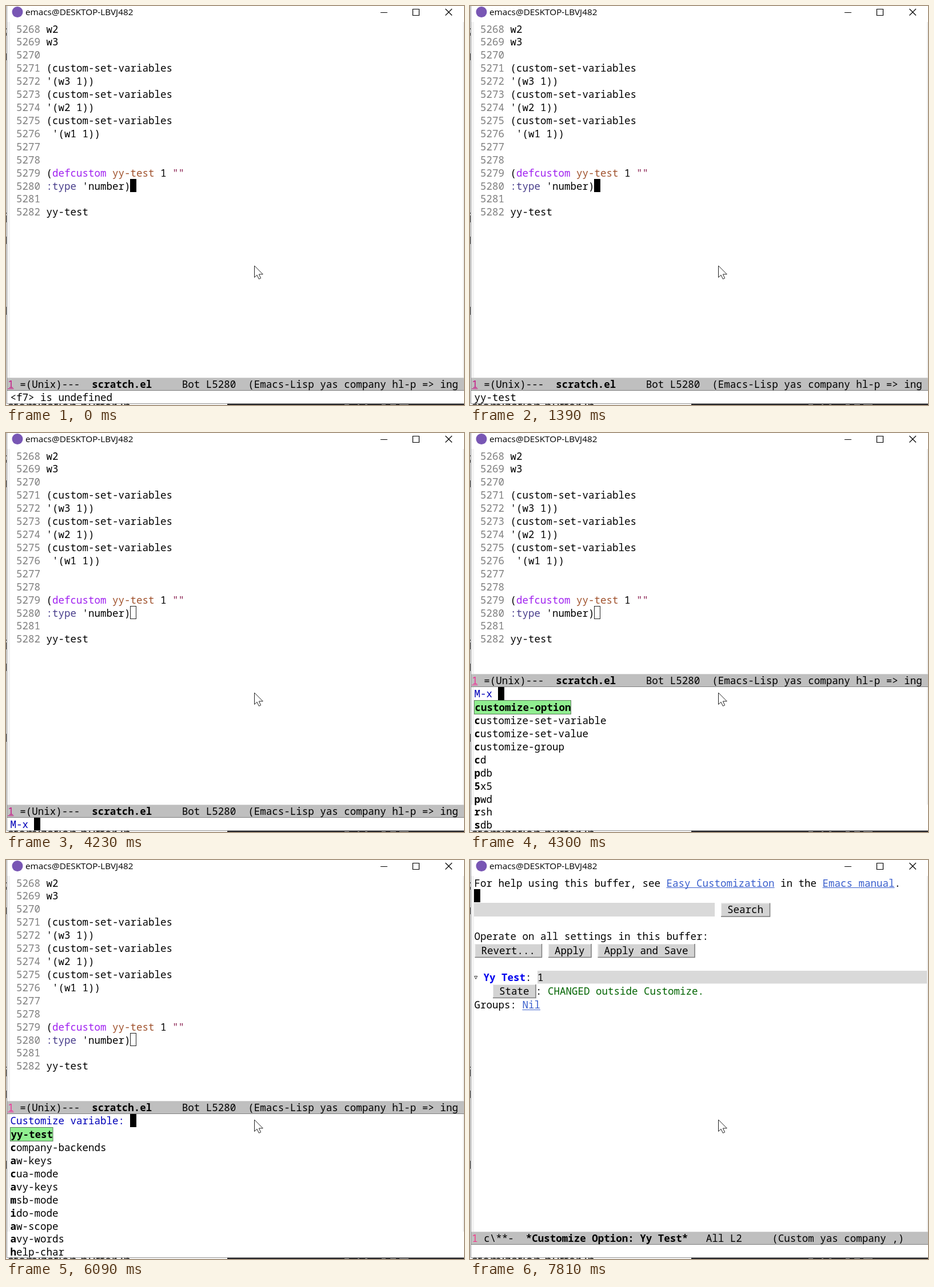
Write an HTML page that moves like this. It is 801 px wide and 699 px high and loops after 8000 ms.

```html
<!DOCTYPE html>
<html lang="en">
<head>
<meta charset="utf-8">
<title>Customize option</title>
<style>
html, body { margin: 0; width: 100%; height: 100%; overflow: hidden; background: #fff; }
svg { display: block; width: 801px; height: 699px; }
text { font: 17.5px "Noto Sans Mono", monospace; white-space: pre; }
text.ui { font: 15.3px "Open Sans", "Noto Sans", sans-serif; }
text.under { font: 22px "Noto Sans", sans-serif; }
.b { font-weight: 700; }
</style>
</head>
<body>
<svg id="stage" viewBox="0 0 801 699" xmlns="http://www.w3.org/2000/svg"></svg>
<script>
const NS = 'http://www.w3.org/2000/svg';
const stage = document.getElementById('stage');
const CW = 10.5, LH = 22.92, LEFT = 7.5, ASCENT = 17.5, LOOP = 8000;
const parts = [];

function add(parent, tag, attrs, text) {
  const el = document.createElementNS(NS, tag);
  for (const k in attrs) el.setAttribute(k, attrs[k]);
  if (text !== undefined) el.textContent = text;
  parent.appendChild(el);
  return el;
}
const rect = (g, x, y, width, height, fill, more) =>
  add(g, 'rect', { x, y, width, height, fill, ...more });
const path = (g, d, stroke, more) =>
  add(g, 'path', { d, stroke, fill: 'none', ...more });
const text = (g, x, y, str, fill = '#000', cls = '') =>
  add(g, 'text', { x, y, fill, class: cls }, str);

// Writes [string, colour, class] pieces one after another on the character grid.
function run(g, x, y, ...pieces) {
  for (const [str, fill, cls] of pieces) {
    text(g, x, y, str, fill, cls);
    x += str.length * CW;
  }
}

// A group that is visible in [from, to).
function scene(from, to) {
  const g = add(stage, 'g', {});
  parts.push({ g, from, to });
  return g;
}

function link(g, x, y, str) {
  text(g, x, y, str, '#3a5fcd');
  rect(g, x, Math.round(y + 1.5), str.length * CW, 1, '#3a5fcd');
}

function button(g, x, y, str) {
  const w = str.length * CW + 23, h = 24;
  rect(g, x, y, w, h, '#d3d3d3');
  path(g, `M${x + .5} ${y + h}V${y + .5}H${x + w}`, '#ededed');
  path(g, `M${x} ${y + h - .5}H${x + w - .5}V${y}`, '#7c7c7c', { 'stroke-width': 1.5 });
  text(g, x + 11, y + ASCENT, str);
}

function modeline(g, y, ...pieces) {
  rect(g, 2, y, 799, 22, '#bfbfbf');
  rect(g, 2, y, 799, 1, '#d4d4d4');
  rect(g, 2, y + 22, 799, 1, '#808080');
  run(g, 3.2, y + ASCENT, ...pieces);
}

// Cursors sit on whole pixels.
const cursor = (g, x, y) => rect(g, Math.floor(x), y, 11, 23, '#000');

function backdrop() {
  const g = add(stage, 'g', {});
  rect(g, 0, 0, 801, 699, '#fff');
  rect(g, 0, 0, 2, 699, '#f3f3f3');
  for (const [y, h] of [[39, 2], [47, 5], [83, 12], [362, 2], [367, 12], [404, 13], [527, 14]])
    rect(g, 0, y, 1.5, h, '#555');
  rect(g, 1, 0, 1, 697, '#8c8c8c');
  rect(g, 2, 28, 5, 623, '#f2f2f2');
  rect(g, 799, 28, 2, 623, '#ededed');

  add(g, 'circle', { cx: 20, cy: 10.5, r: 9.5, fill: '#7856b4' });
  text(g, 34, 16, 'emacs@DESKTOP-LBVJ482', '#000', 'ui');
  path(g, 'M655 11.5H667M711.5 5.5H722.5V16.5H711.5ZM768.5 5L780 16.5M780 5L768.5 16.5',
    '#000', { 'stroke-width': 1.2 });
}

function source() {
  const g = scene(0, 6700);
  const base = i => 46.5 + i * LH;
  const lines = ['w2', 'w3', '', '(custom-set-variables', "'(w3 1))",
    '(custom-set-variables', "'(w2 1))", '(custom-set-variables', " '(w1 1))",
    '', '', '', '', '', 'yy-test'];
  lines.forEach((line, i) =>
    run(g, LEFT + CW, base(i), [`${5268 + i} `, '#7f7f7f'], [line]));
  const x = LEFT + 6 * CW;
  run(g, x, base(11), ['('], ['defcustom', '#a020f0'], [' '],
    ['yy-test', '#a0522d'], [' 1 '], ['""', '#8b2252']);
  run(g, x, base(12), [':type', '#483d8b'], [" 'number)"]);

  cursor(scene(0, 4230), LEFT + 20 * CW, 303);
  rect(scene(4230, 6700), 217.5, 303.5, 10, 22, 'none', { stroke: '#222' });

  const bar = (from, to, top, pink) => {
    const m = scene(from, to);
    modeline(m, top, ['1', pink], [' =(Unix)---  '], ['scratch.el', '#000', 'b'],
      ['     Bot L5280  (Emacs-Lisp yas company hl-p => ing']);
    rect(m, 3, top + 19, CW, 1, pink);
  };
  bar(0, 4300, 651, '#c71585');
  bar(4300, 6700, 422, '#ee2f96');
}

function echo(from, to, str) {
  text(scene(from, to), LEFT, 674 + ASCENT, str);
}

function prompt(from, to, y, str) {
  const g = scene(from, to);
  text(g, LEFT, y + ASCENT, str, '#0000b8');
  cursor(g, LEFT + str.length * CW, y);
}

function candidates(from, to, first, rest) {
  const g = scene(from, to);
  rect(g, 7.5, 468.5, first.length * CW + 1, 24, '#90ee90', { stroke: '#5a7d5a' });
  text(g, 8.5, 486.5, first, '#000', 'b');
  rest.forEach((s, i) =>
    run(g, LEFT, 510 + i * LH, [s[0], '#000', 'b'], [s.slice(1)]));
}

function customize() {
  const g = scene(6700, LOOP);
  run(g, LEFT, 46.5, ['For help using this buffer, see ']);
  link(g, LEFT + 32 * CW, 46.5, 'Easy Customization');
  text(g, LEFT + 50 * CW, 46.5, ' in the ');
  link(g, LEFT + 58 * CW, 46.5, 'Emacs manual');
  text(g, LEFT + 70 * CW, 46.5, '.');

  rect(g, 7, 75, 421, 24, '#d9d9d9');
  button(g, 439, 75.5, 'Search');
  text(g, LEFT, 140, 'Operate on all settings in this buffer:');
  button(g, 8.5, 147, 'Revert...');
  button(g, 137, 147, 'Apply');
  button(g, 223.5, 147, 'Apply and Save');

  path(g, 'M7.7 203.5H12.8L10.2 208.5Z', '#222', { 'stroke-width': .9 });
  run(g, 23.5, 211.5, ['Yy Test', '#0000ee', 'b'], [':']);
  rect(g, 118, 194, 681, 22.5, '#d9d9d9');
  text(g, 118, 211.5, '1');
  button(g, 40, 218, 'State');
  run(g, 115, 235.5, [': '], ['CHANGED outside Customize.', '#006400']);
  text(g, LEFT, 260, 'Groups: ');
  link(g, LEFT + 8 * CW, 260, 'Nil');

  const top = scene(6700, 7810);
  cursor(top, LEFT, 28);
  text(top, LEFT, 46.5, 'F', '#fff');
  cursor(scene(7810, LOOP), LEFT, 51);

  for (const [n, from, to] of [[1, 6700, 7810], [2, 7810, LOOP]])
    modeline(scene(from, to), 651, ['1', '#f5388a'], [' c\\**-  '],
      ['*Customize Option: Yy Test*', '#000', 'b'],
      [`   All L${n}     (Custom yas company ,)`]);
}

function overlay() {
  const g = add(stage, 'g', {});
  path(g, 'M434.5 455V475.5L439 471.3L442.3 478.3L445.6 476.8L442.4 470H449.3Z',
    '#222', { fill: '#fff' });
  const clip = add(add(g, 'clipPath', { id: 'edge' }), 'rect',
    { x: 0, y: 697, width: 801, height: 2 });
  const e = add(g, 'g', { 'clip-path': 'url(#edge)' });
  rect(e, 0, 697, 387, 2, '#f4f4f4');
  text(e, 3, 709, 'stomization buffer in', '#222', 'under');
  rect(e, 387, 697, 414, 2, '#26262a');
  for (const [x, w] of [[592, 8], [615, 3], [628, 4], [657, 7], [672, 10], [688, 16]])
    rect(e, x, 698, w, 1, '#aaa');
  rect(g, 1, 696, 800, 1, '#999');
}

backdrop();
source();
echo(0, 930, '<f7> is undefined');
echo(1390, 4230, 'yy-test');
prompt(4230, 4300, 674, 'M-x ');
prompt(4300, 6020, 445, 'M-x ');
candidates(4300, 6020, 'customize-option', ['customize-set-variable',
  'customize-set-value', 'customize-group', 'cd', 'pdb', '5x5', 'pwd', 'rsh', 'sdb']);
prompt(6020, 6700, 445, 'Customize variable: ');
candidates(6090, 6700, 'yy-test', ['company-backends', 'aw-keys', 'cua-mode',
  'avy-keys', 'msb-mode', 'ido-mode', 'aw-scope', 'avy-words', 'help-char']);
customize();
echo(6700, 7810, 'Creating customization setup...done');
overlay();

function render(t) {
  for (const { g, from, to } of parts)
    g.style.display = t >= from && t < to ? '' : 'none';
}

const start = performance.now();
function tick() {
  render((performance.now() - start) % LOOP);
  requestAnimationFrame(tick);
}
tick();
</script>
</body>
</html>
```
